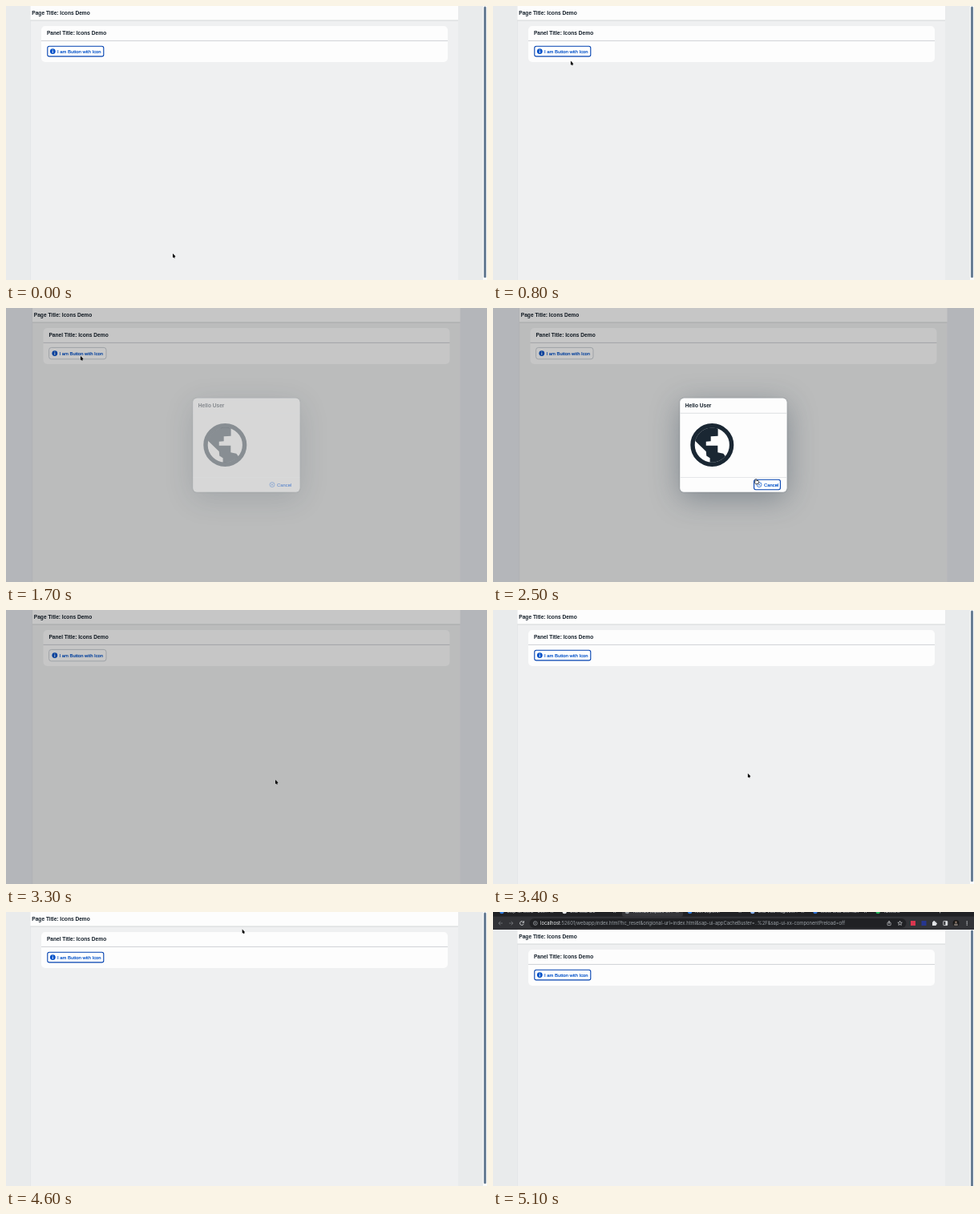
Animation, 600 px wide and 342 px high, one loop 5.4 s. Source, as an HTML page with a canvas:

```html
<!DOCTYPE html>
<html lang="en">
<head>
<meta charset="utf-8">
<title>Icons Demo</title>
<style>
  html, body { margin: 0; width: 100%; height: 100%; overflow: hidden; }
  canvas { display: block; width: 600px; height: 342px; }
</style>
</head>
<body>
<canvas id="stage"></canvas>
<script>
const W = 600, H = 342, LOOP = 5400, STEP = 100, BAR = 22;
const INK = '#131e29', LINK = '#0050c8', FOCUS = '#0040b0';
const UI_FONT = '"Liberation Sans", Arial, sans-serif';
const BROWSER_FONT = 'Inter, sans-serif';

const canvas = document.getElementById('stage');
const ctx = canvas.getContext('2d');
const ratio = window.devicePixelRatio || 1;
canvas.width = W * ratio;
canvas.height = H * ratio;

const progress = (t, from, to) => Math.min(1, Math.max(0, (t - from) / (to - from)));
const ease = k => k * k * (3 - 2 * k);

// The pointer rests at each stop, then glides to the next one
const START = { x: 208, y: 309 };
const MOVES = [
  { from: 0, to: 900, x: 93, y: 60 },
  { from: 2000, to: 2500, x: 328, y: 214 },
  { from: 2600, to: 3300, x: 336, y: 212 },
  { from: 3300, to: 3600, x: 266, y: 181 },
  { from: 4300, to: 4700, x: 300, y: -8 }
];

function pointerAt(t) {
  return MOVES.reduce((p, move) => {
    const k = ease(progress(t, move.from, move.to));
    return { x: p.x + (move.x - p.x) * k, y: p.y + (move.y - p.y) * k };
  }, START);
}

function group(x, y, scale, drawing) {
  ctx.save();
  ctx.translate(x, y);
  ctx.scale(scale, scale);
  drawing();
  ctx.restore();
}

function paint(fill, stroke, width = 1) {
  if (fill) { ctx.fillStyle = fill; ctx.fill(); }
  if (stroke) { ctx.strokeStyle = stroke; ctx.lineWidth = width; ctx.stroke(); }
}

function rect(x, y, w, h, color) {
  ctx.fillStyle = color;
  ctx.fillRect(x, y, w, h);
}

function box(x, y, w, h, r, fill, stroke, width) {
  ctx.beginPath();
  ctx.roundRect(x, y, w, h, r);
  paint(fill, stroke, width);
}

function disc(x, y, r, fill, stroke, width) {
  ctx.beginPath();
  ctx.arc(x, y, r, 0, Math.PI * 2);
  paint(fill, stroke, width);
}

function polygon(points, fill, stroke, width) {
  ctx.beginPath();
  points.forEach(([x, y]) => ctx.lineTo(x, y));
  ctx.closePath();
  paint(fill, stroke, width);
}

function line(color, width, ...points) {
  ctx.beginPath();
  points.forEach(([x, y]) => ctx.lineTo(x, y));
  paint(null, color, width);
}

function cross(x, y, r, color) {
  line(color, 0.7, [x - r, y - r], [x + r, y + r]);
  line(color, 0.7, [x + r, y - r], [x - r, y + r]);
}

function text(str, x, y, font, color) {
  ctx.font = font;
  ctx.fillStyle = color;
  ctx.fillText(str, x, y);
}

const title = (str, x, y) => text(str, x, y, `bold 6.6px ${UI_FONT}`, INK);

// Semibold caption: regular widths with a slight outline
function caption(str, x, y) {
  text(str, x, y, `5.85px ${UI_FONT}`, LINK);
  ctx.strokeStyle = LINK;
  ctx.lineWidth = 0.18;
  ctx.strokeText(str, x, y);
}

function drawPage(modal, pressed) {
  rect(0, 0, W, H, modal ? '#e6e9ee' : '#e9ebec');
  group(modal ? 2.5 : 0, 0, 1, () => {
    rect(30.5, 0, 533.5, H, '#eff0f1');
    rect(30, 0, 0.6, H, '#dfe1e3');
    rect(30.5, 0, 533.5, 17.6, '#fdfdfd');
    rect(30.5, 17.6, 533.5, 0.9, '#d3d6d8');
    title('Page Title: Icons Demo', 32.3, 11.4);

    box(44, 25, 507, 45, 5, '#fdfdfd');
    rect(44, 42.9, 507, 0.9, '#cbced1');
    title('Panel Title: Icons Demo', 50.9, 36.4);

    if (modal) box(51.1, 49.4, 71.4, 14.4, 3, '#fff', '#b5bcc4', 0.7);
    else if (pressed) box(51.6, 50, 70.6, 13.2, 2.6, '#edf3fc', FOCUS, 1.6);
    else box(51.8, 50.3, 70, 12.6, 2.2, '#fff', FOCUS, 1.1);
    disc(58.3, 56.6, 3.4, LINK);
    rect(57.8, 54.5, 1, 1, '#fff');
    rect(57.8, 56.1, 1, 2.6, '#fff');
    caption('I am Button with Icon', 64, 58.6);
  });
  if (!modal) {
    rect(595, 0, 5, H, '#fafbfb');
    box(596, 0.5, 3, 338.8, 1.5, '#687d94');
  }
}

// A ring around one angular land mass
function drawGlobe() {
  const color = '#1a2733';
  disc(0, 0, 9, null, color, 2);
  ctx.beginPath();
  ctx.arc(0, 0, 8.05, 0, Math.PI * 2);
  ctx.clip();
  polygon([
    [-9, -3], [-2.8, 3], [-2.6, 5], [-1, 6], [-1, 9], [9, 9],
    [5.2, 4], [2.6, 3.4], [2.6, 0.3], [-2.8, 0.3], [-2.8, -1.6],
    [-0.6, -1.8], [-0.6, -4], [2.7, -4.2], [2.7, -9], [-9, -9]
  ], color);
}

function drawDialog(alpha, focused) {
  const frame = [233.4, 112.8, 133, 116.8, 5];
  ctx.save();
  ctx.globalAlpha = alpha;

  // The shadow falls only outside the frame
  ctx.save();
  ctx.beginPath();
  ctx.rect(0, 0, W, H);
  ctx.roundRect(...frame);
  ctx.clip('evenodd');
  ctx.shadowColor = 'rgba(34,53,72,.38)';
  for (const [blur, drop] of [[36, 8], [2, 0]]) {
    ctx.shadowBlur = blur * ratio;
    ctx.shadowOffsetY = drop * ratio;
    box(...frame, '#fdfdfd');
  }
  ctx.restore();

  box(...frame, '#fdfdfd');
  rect(233.4, 130.8, 133, 0.8, '#d5d8da');
  rect(233.4, 211, 133, 0.7, '#dcdfe1');
  title('Hello User', 239.8, 124.4);
  group(273.3, 171, 2.7, drawGlobe);
  if (focused) box(325.6, 214.2, 32.8, 12.6, 2.2, '#fff', FOCUS, 1.1);
  disc(332, 220.5, 3, null, LINK, 0.7);
  cross(332, 220.5, 1.2, LINK);
  caption('Cancel', 338, 222.5);
  ctx.restore();
}

function drawArrow() {
  line('#000', 1.1, [1.2, 3], [2.3, 5.4]);
  polygon([[0, 0], [0, 5], [3.5, 3.6]], '#000');
}

function drawHand() {
  box(-1.2, 1.4, 4.6, 4.2, 1.4, '#fff', '#111', 0.8);
  box(-0.8, -0.6, 1.6, 4, 0.8, '#fff', '#111', 0.6);
  rect(-0.5, 2, 3.4, 2.8, '#fff');
}

function drawStar(x, y) {
  const points = Array.from({ length: 10 }, (_, i) => {
    const a = i * Math.PI / 5 - Math.PI / 2, r = i % 2 ? 1.25 : 2.9;
    return [x + r * Math.cos(a), y + r * Math.sin(a)];
  });
  polygon(points, null, '#e3e5e8', 0.6);
}

function drawNavArrow(x, dir) {
  const tip = [x + dir * 2.5, 14], neck = x + dir * 0.2;
  line('#75787c', 0.8, [x - dir * 2.5, 14], tip);
  line('#75787c', 0.8, [neck, 11.6], tip, [neck, 16.4]);
}

const TABS = [
  ['#2f7de1', 'Step 10: Icons - Dev…'], ['#e8eaed', 'ORB Web IDE'],
  ['#9aa0a6', 'Tutorials (square UI…'], ['#2f7de1', 'Icon Explorer'],
  ['#8ab4f8', 'ORB Vela Fragment…'], ['#2a6fd6', 'Wimo Chat with KLR'],
  ['#25b75a', 'Talkvane']
];

function drawBrowserBar() {
  const lit = '#e3e5e8', font = `5.83px ${BROWSER_FONT}`, host = 'localhost';
  rect(0, 0, W, BAR, '#202124');
  box(161, -8, 76, 14, 3, '#35363a');
  rect(0, 5.6, W, 16.4, '#323337');
  TABS.forEach(([color, label], i) => {
    const x = 11 + i * 78.2;
    disc(x, -0.6, 2.8, color);
    text(label, x + 6.5, 1.3, `5px ${BROWSER_FONT}`, '#dfe1e5');
    if (i < TABS.length - 1) cross(x + 62.5, -0.5, 1.5, '#c4c7cc');
  });
  rect(555.5, -1, 4.5, 0.7, lit);
  rect(557.4, -3, 0.7, 4.4, lit);

  drawNavArrow(9.5, -1);
  drawNavArrow(22.5, 1);
  ctx.beginPath();
  ctx.arc(36, 14, 2.4, 0.3, 5.5);
  paint(null, lit, 0.8);
  line(lit, 0.8, [38.5, 11.2], [38.5, 13.3], [36.4, 13.3]);

  box(45.5, 8, 470, 12, 6, '#202124');
  disc(52.8, 14, 2.4, null, '#bdc1c6', 0.6);
  rect(52.5, 12.6, 0.6, 2.7, '#bdc1c6');
  text(host, 59, 16, font, '#f1f3f4');
  text(':52601/webapp/index.html?hc_reset&origional-url=index.html&sap-ui-appCacheBuster=..%2F&sap-ui-xx-componentPreload=off',
    59 + ctx.measureText(host).width, 16, font, '#9aa0a6');

  box(492, 13.2, 4.2, 3.4, 0.5, null, lit, 0.6);
  line(lit, 0.6, [494.1, 15], [494.1, 11.2]);
  line(lit, 0.6, [492.9, 12.4], [494.1, 11.2], [495.3, 12.4]);
  drawStar(507.6, 14.1);
  rect(521, 11, 6, 6, '#d9364f');
  rect(534.5, 11, 6, 6, '#26368f');
  rect(548, 12.4, 4.7, 4.6, lit);
  disc(550.2, 12.2, 1.2, lit);
  disc(552.7, 14.6, 1.2, lit);
  box(561.8, 11.4, 5, 5.2, 0.6, null, lit, 0.8);
  rect(564.4, 11.4, 2.4, 5.2, lit);
  disc(577.5, 14, 3.9, '#191817');
  disc(577.5, 12.8, 1.3, '#8d7768');
  box(575.1, 14.6, 4.8, 2.7, 1.2, '#77706c');
  for (let i = -1; i <= 1; i++) disc(591.2, 14 + i * 2.1, 0.65, lit);
}

function draw(t) {
  const modal = t >= 1700 && t < 3400;
  const slide = BAR * progress(t, 4600, 4800);
  const dialog = progress(t, 1600, 1840) * (1 - progress(t, 3100, 3300));
  const pointer = pointerAt(t);
  const onButton = t < 1700 && pointer.y < 64;
  const onCancel = t >= 2500 && t < 3300;

  ctx.setTransform(ratio, 0, 0, ratio, 0, 0);
  group(0, slide, 1, () => drawPage(modal, onButton));
  if (modal) rect(0, 0, W, H, 'rgba(0,0,0,.22)');
  if (dialog > 0) drawDialog(dialog, t >= 1900);
  if (slide > 0) group(0, slide - BAR, 1, drawBrowserBar);
  group(pointer.x, pointer.y, 1, onButton || onCancel ? drawHand : drawArrow);
}

const start = performance.now();
function frame() {
  const t = (performance.now() - start) % LOOP;
  draw(Math.floor(t / STEP) * STEP);
  requestAnimationFrame(frame);
}
frame();
</script>
</body>
</html>
```
